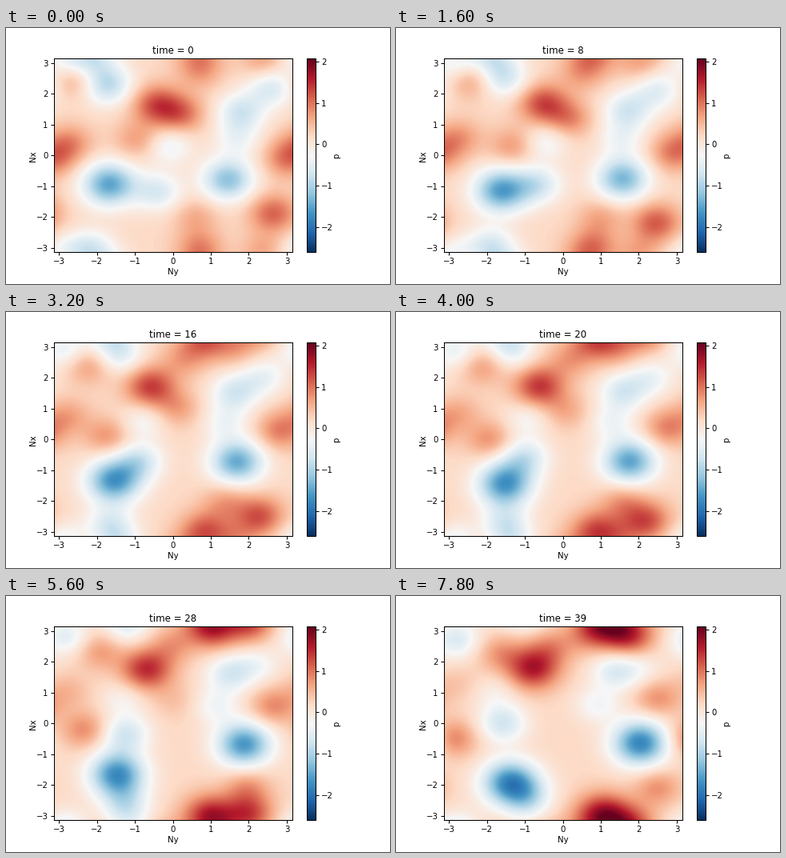
Animation of 480 by 320 pixels, one loop 8000 ms. Source, as a matplotlib script:

```python
import numpy as np
import matplotlib.pyplot as plt
from matplotlib.animation import FuncAnimation

W, H, DPI = 480, 320, 100
FRAMES, STEP = 40, 200
LOW, HIGH, BASE = -2.6, 2.07, 0.2
PI = np.pi
LABEL, TITLE = 7.3, 8.5

plt.rcParams.update({"font.family": "DejaVu Sans", "axes.linewidth": 0.75})

# Each eddy drifts steadily from one (x, y, height) to another
EDDIES = {
    "warm": [
        [(-.45, 1.65, 1.0), (-.8, 1.8, 1.4)],
        [(.2, 1.35, .8), (0, .5, 0)],
        [(.7, 2.7, .4), (-.3, 2.5, .5)],
        [(.7, -3, .6), (1.05, -3, 1.5)],
        [(2.65, -1.9, .9), (1.75, -3.4, 1.2)],
        [(.6, -2, .4), (2.5, -2.1, .6)],
        [(2.4, 3.1, .5), (.6, 2.8, .3)],
        [(3.05, -.1, .8), (2.5, .8, .6)],
        [(-2.75, .4, .6), (-2.8, 1.3, .2)],
        [(-.95, .5, .5), (-2.9, -.5, .7)],
        [(-2.6, 2.5, .6), (-1.7, 2.3, .5)],
    ],
    "cold": [
        [(-1.7, -.95, -1.7), (-1.4, -1.95, -2)],
        [(-.4, -1.2, -.8), (-1.6, 0, -.9)],
        [(-2.2, -3.1, -.9), (-.9, -2.4, -.6)],
        [(-2.9, -3.2, -.5), (-2.85, -3.55, -.8)],
        [(1.45, -.8, -1.4), (2.05, -.65, -2)],
        [(1.8, 1.4, -.9), (1.4, 1.7, -.8)],
        [(2.6, 2.2, -.8), (2.1, 1.8, -.3)],
        [(1.7, .5, -.5), (.9, .6, -.5)],
        [(-1.75, 2.3, -1.1), (-1, 3.4, -.2)],
        [(-.1, .3, -.6), (-1.8, 1, -.3)],
    ],
}
paths = np.array(EDDIES["warm"] + EDDIES["cold"])
grid = np.linspace(-PI, PI, 160)


def bump(center, width):
    """Gaussian on a periodic axis."""
    d = (grid - center + PI) % (2 * PI) - PI
    return np.exp(-d ** 2 / (2 * width ** 2))


def field(t):
    u = t / (FRAMES - 1)
    z = np.full((grid.size, grid.size), BASE)
    for x, y, height in (1 - u) * paths[:, 0] + u * paths[:, 1]:
        width = 0.39 + 0.07 * abs(height)  # stronger eddies are wider
        z += height * np.outer(bump(y, width), bump(x, width))
    return z


def panel(left, right, top=38.4, bottom=280):
    return fig.add_axes([left / W, 1 - bottom / H,
                         (right - left) / W, (bottom - top) / H])


def label(x, y, text, size=LABEL, angle=0):
    return fig.text(x / W, 1 - y / H, text, fontsize=size, rotation=angle,
                    ha="center", va="center")


fig = plt.figure(figsize=(W / DPI, H / DPI), dpi=DPI, facecolor="white")
ax = panel(59.6, 357.6)
bar = panel(376, 387)

image = ax.imshow(field(0), origin="lower", extent=(-PI, PI, -PI, PI),
                  aspect="auto", cmap="RdBu_r", vmin=LOW, vmax=HIGH,
                  interpolation="bilinear")
ax.set(xticks=range(-3, 4), yticks=range(-3, 4))
fig.colorbar(image, cax=bar, ticks=range(-2, 3))
for axes in (ax, bar):
    axes.tick_params(labelsize=LABEL, length=2.6, width=0.75, pad=2.4)

title = label(208.6, 29, "time = 0", TITLE)
label(209, 305.5, "Ny")
label(34, 160, "Nx", angle=90)
label(413, 160, "p", angle=90)


def draw(t):
    image.set_data(field(t))
    title.set_text(f"time = {t}")
    return image, title


anim = FuncAnimation(fig, draw, frames=FRAMES, interval=STEP, repeat=True,
                     repeat_delay=0, blit=False)
plt.show()
```
